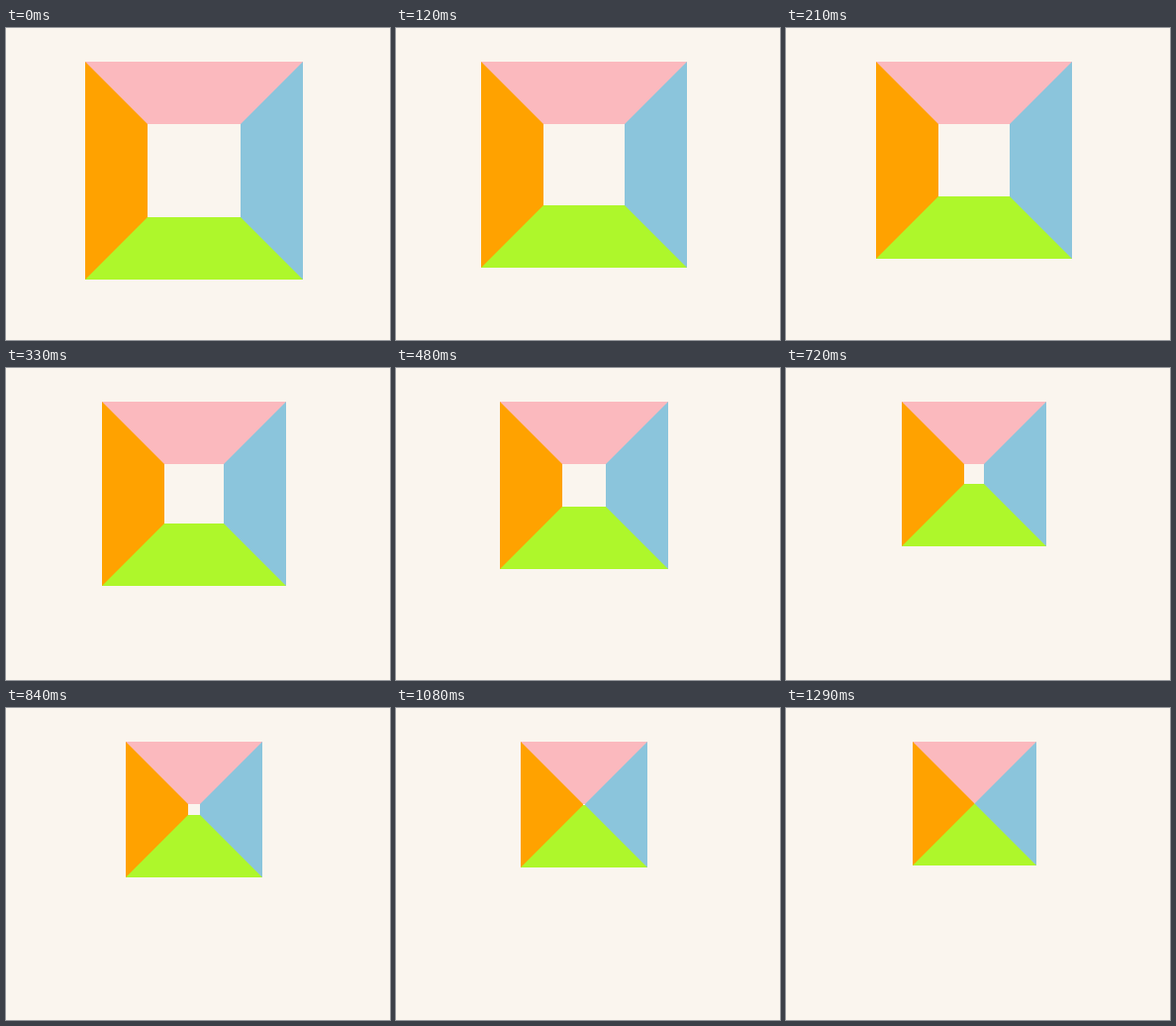
Write an HTML page with a canvas that moves like this. It is 388x315 px and loops after 2070 ms.

```html
<!DOCTYPE html>
<html lang="en">
<head>
<meta charset="utf-8">
<title>Closing frame</title>
<style>
  html, body { margin: 0; width: 100%; height: 100%; overflow: hidden; background: #faf5ee; }
  canvas { display: block; }
</style>
</head>
<body>
<canvas id="stage" width="388" height="315"></canvas>
<script>
const ctx = document.getElementById('stage').getContext('2d');

const BG = '#faf5ee', PINK = '#fbb9be', BLUE = '#8bc5dc', GREEN = '#aef72b', ORANGE = '#ffa200';
const LOOP = 2070, STEP = 30;
const TOP = 34, CENTER = 190.5, BORDER = 63, CLOSED = 125;
const GAP = 118.3;                    // full opening; the loop starts part-way through closing
const DURATION = 1813, END = 1250, SETTLE = 1290;

// cubic-bezier(.42, 0, .58, 1)
function easeInOut(x) {
  if (x <= 0) return 0;
  if (x >= 1) return 1;
  let lo = 0, hi = 1;
  for (let i = 0; i < 30; i++) {
    const u = (lo + hi) / 2, v = 1 - u;
    if (1.26 * u * v * v + 1.74 * u * u * v + u * u * u < x) lo = u; else hi = u;
  }
  return lo * lo * (3 - 2 * lo);
}

function poly(color, ...points) {
  ctx.fillStyle = color;
  ctx.beginPath();
  for (const [x, y] of points) ctx.lineTo(x, y);
  ctx.fill();
}

function rect(color, x, y, w, h) {
  ctx.fillStyle = color;
  ctx.fillRect(x, y, w, h);
}

function draw(t) {
  const gap = GAP * easeInOut((END - t) / DURATION);
  const size = CLOSED + (t < SETTLE ? Math.max(gap, 0.1) : 0);
  const l = Math.floor(CENTER - size / 2), r = Math.floor(CENTER + size / 2);
  const bottom = Math.round(TOP + size);
  const w = r - l, h = bottom - TOP;
  const b = Math.min(BORDER, w / 2, h / 2);
  const y1 = TOP + b, y2 = bottom - b;

  rect(BG, 0, 0, 388, 315);
  rect(PINK, l, TOP, w, b);
  rect(GREEN, l, y2, w, b);
  poly(ORANGE, [l, TOP], [l + b, y1], [l + b, y2], [l, bottom]);
  poly(BLUE, [r, TOP], [r - b, y1], [r - b, y2], [r, bottom]);
  if (w > 2 * b && h > 2 * b) rect(BG, l + b, y1, w - 2 * b, h - 2 * b);
}

const start = performance.now();
function tick() {
  const t = (performance.now() - start) % LOOP;
  draw(Math.floor(t / STEP) * STEP);
  requestAnimationFrame(tick);
}
tick();
</script>
</body>
</html>
```
